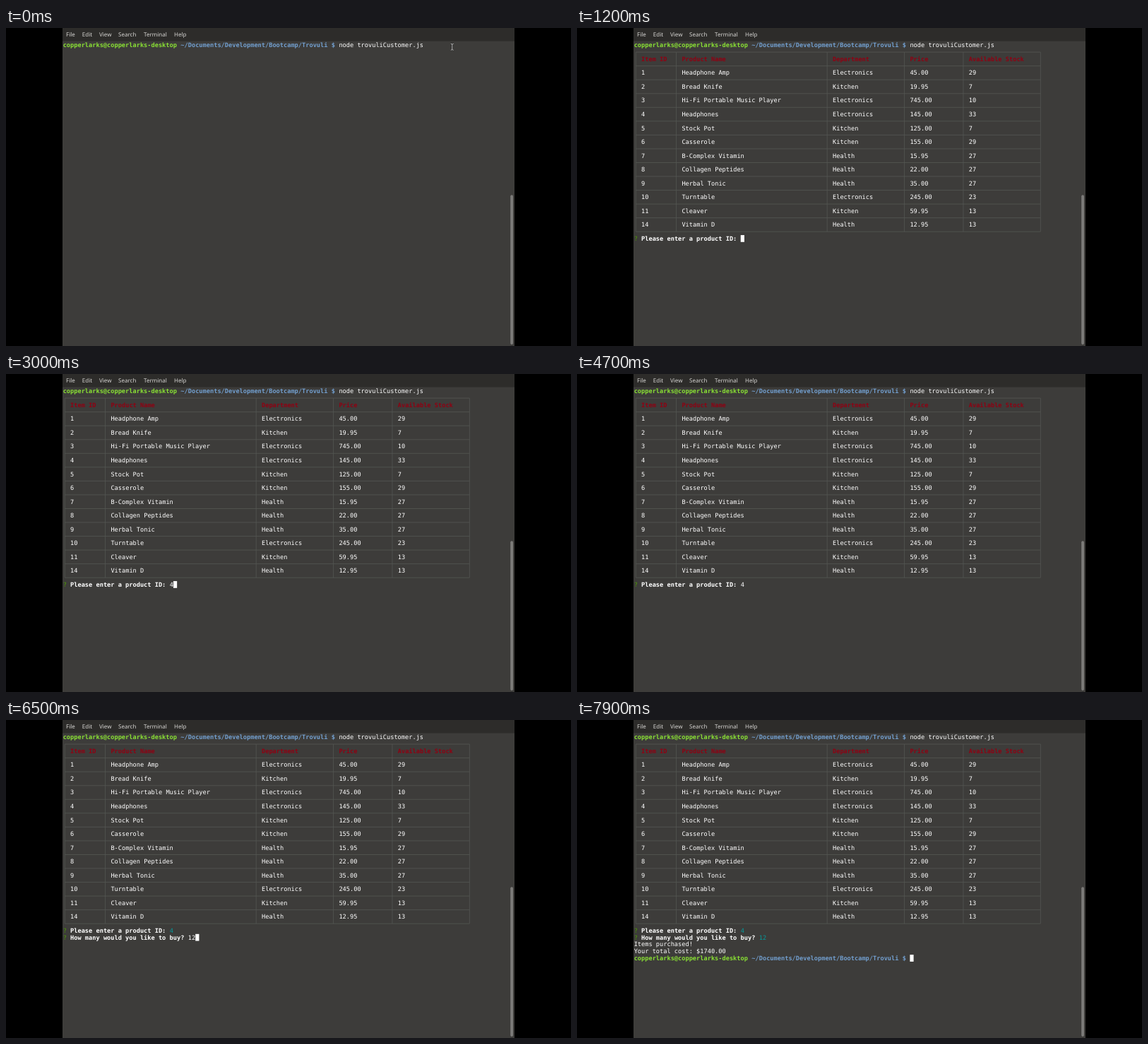
An HTML page that plays this animation: 800 by 450 pixels, repeating every 8 s.

```html
<!DOCTYPE html>
<html lang="en">
<head>
<meta charset="utf-8">
<title>Terminal shop session</title>
<style>
  html, body { margin: 0; width: 100%; height: 100%; overflow: hidden; background: #000; }
  svg { display: block; width: 800px; height: 450px; }
  text { text-rendering: geometricPrecision; white-space: pre; }
  .menu { font: 8px "Noto Sans", "Open Sans", sans-serif; fill: #d6d5d2; }
  #term { font: 8.654px "DejaVu Sans Mono", monospace; fill: #fff; }
  .bold { font-weight: bold; }
  .user { font-weight: bold; fill: #8ae234; }
  .path { font-weight: bold; fill: #729fcf; }
  .head { font-weight: bold; fill: #900012; }
  .mark { fill: #4e9a06; }
  .answer { fill: #06989a; }
  .grid { fill: none; stroke: #555753; stroke-width: .8; }
</style>
</head>
<body>
<svg viewBox="0 0 800 450">
  <rect x="80" width="640" height="450" fill="#3d3c3a"/>
  <rect x="80" width="640" height="18.6" fill="#2d2c2a"/>
  <g class="menu">
    <text x="85" y="12.4">File</text>
    <text x="107.8" y="12.4">Edit</text>
    <text x="132" y="12.4">View</text>
    <text x="159" y="12.4">Search</text>
    <text x="195" y="12.4">Terminal</text>
    <text x="238" y="12.4">Help</text>
  </g>
  <rect x="714.2" y="236.3" width="3.8" height="211.7" rx="1.9" fill="#7c7b79"/>
  <g id="term"></g>
</svg>
<script>
const LOOP = 8000;
const CELL = { w: 5.21, h: 9.77 };
const colX = col => 80.65 + col * CELL.w;
const rowY = row => 19.5 + row * CELL.h;
const screenGroup = document.getElementById('term');
const timed = [];

function add(parent, tag, attrs, content) {
  const el = document.createElementNS('http://www.w3.org/2000/svg', tag);
  for (const key in attrs) el.setAttribute(key, attrs[key]);
  if (content) el.textContent = content;
  parent.appendChild(el);
  return el;
}

// A group that is visible only between two times
function during(from, to = LOOP) {
  const el = add(screenGroup, 'g', {});
  timed.push({ el, from, to });
  return el;
}

function write(parent, row, col, content, style = '') {
  add(parent, 'text', { x: colX(col), y: rowY(row) + 7.8, class: style }, content);
}

function shellPrompt(parent, row) {
  write(parent, row, 0, 'copperlarks@copperlarks-desktop', 'user');
  write(parent, row, 32, '~/Documents/Development/Bootcamp/Trovuli $', 'path');
}

function ask(parent, row, question) {
  write(parent, row, 0, '?', 'mark');
  write(parent, row, 2, question, 'bold');
}

function drawTable(parent) {
  const edges = [0, 11, 52, 73, 89, 110];
  const rows = [
    'Item ID|Product Name|Department|Price|Available Stock',
    '1|Headphone Amp|Electronics|45.00|29',
    '2|Bread Knife|Kitchen|19.95|7',
    '3|Hi-Fi Portable Music Player|Electronics|745.00|10',
    '4|Headphones|Electronics|145.00|33',
    '5|Stock Pot|Kitchen|125.00|7',
    '6|Casserole|Kitchen|155.00|29',
    '7|B-Complex Vitamin|Health|15.95|27',
    '8|Collagen Peptides|Health|22.00|27',
    '9|Herbal Tonic|Health|35.00|27',
    '10|Turntable|Electronics|245.00|23',
    '11|Cleaver|Kitchen|59.95|13',
    '14|Vitamin D|Health|12.95|13'
  ];
  const midX = col => colX(col + .5);
  const midY = row => rowY(row + .5);
  const last = rows.length * 2 + 1;
  let d = edges.map(col => `M${midX(col)} ${midY(1)}V${midY(last)}`).join('');
  for (let row = 1; row <= last; row += 2) d += `M${midX(0)} ${midY(row)}H${midX(110)}`;
  add(parent, 'path', { d, class: 'grid' });
  rows.forEach((line, i) => line.split('|').forEach((cell, j) =>
    write(parent, 2 + i * 2, edges[j] + 2, cell, i ? '' : 'head')));
}

const command = during(0);
shellPrompt(command, 0);
write(command, 0, 75, 'node trovuliCustomer.js');

const pointer = during(0, 800);
const beam = 'M629.9 22.4q1.5 0 1.9 .8q.4 -.8 1.9 -.8M631.8 23v7.6M629.9 31.2q1.5 0 1.9 -.8q.4 .8 1.9 .8';
add(pointer, 'path', { d: beam, fill: 'none', stroke: '#111', 'stroke-width': 2 });
add(pointer, 'path', { d: beam, fill: 'none', stroke: '#fff', 'stroke-width': .8 });

const shop = during(1200);
drawTable(shop);
ask(shop, 28, 'Please enter a product ID:');
write(during(2900, 5000), 28, 29, '4');
write(during(5000), 28, 29, '4', 'answer');

ask(during(5000), 29, 'How many would you like to buy?');
write(during(6100, 6200), 29, 34, '1');
write(during(6200, 6600), 29, 34, '12');
write(during(6600), 29, 34, '12', 'answer');

const receipt = during(6600);
write(receipt, 30, 0, 'Items purchased!');
write(receipt, 31, 0, 'Your total cost: $1740.00');
shellPrompt(during(6700), 32);

// Cursor places: [time, row, column]; a key press restarts the blink
const places = [[0, 0, 98], [800, 1, 0], [1200, 28, 29], [2900, 28, 30], [5000, 29, 34],
  [6100, 29, 35], [6200, 29, 36], [6600, 32, 0], [6700, 32, 75]];
const keys = [-900, 800, 2900, 5000, 6100, 6200, 6700];
const BLINK = 600;
const cursor = add(screenGroup, 'rect', { width: CELL.w, height: CELL.h, fill: '#fff' });

function show(el, on) {
  el.setAttribute('visibility', on ? 'visible' : 'hidden');
}

function draw(t) {
  for (const { el, from, to } of timed) show(el, t >= from && t < to);
  const [, row, col] = places.filter(p => p[0] <= t).pop();
  const key = keys.filter(k => k <= t).pop();
  cursor.setAttribute('x', colX(col));
  cursor.setAttribute('y', rowY(row));
  show(cursor, Math.floor((t - key) / BLINK) % 2 === 0);
}

let startTime;
function tick(now) {
  startTime ??= now;
  draw((now - startTime) % LOOP);
  requestAnimationFrame(tick);
}
draw(0);
requestAnimationFrame(tick);
</script>
</body>
</html>
```
